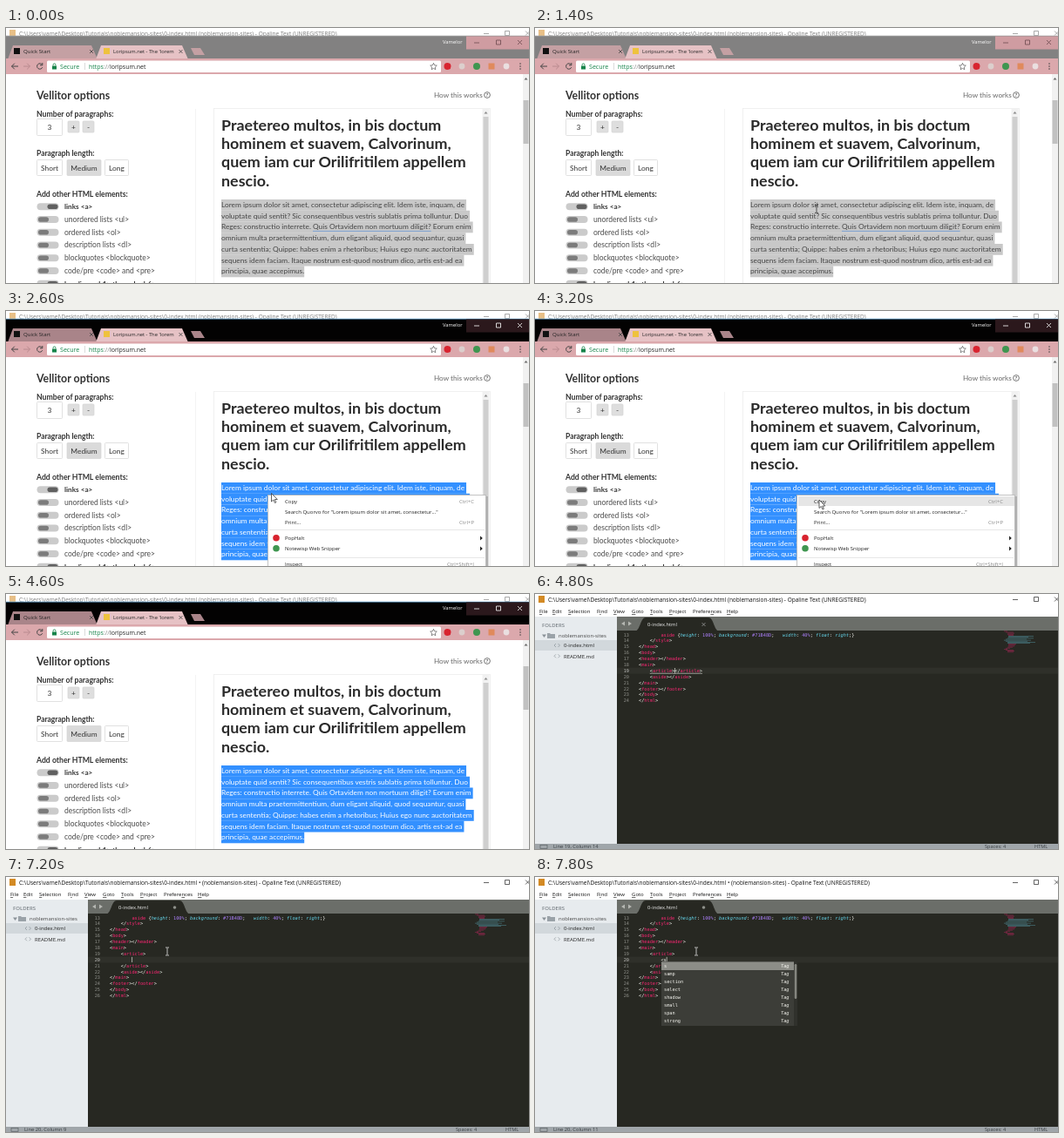
Recreate the animation shown at these times as an HTML page. Size 600 by 293 pixels, loop 8000 ms.

```html
<!DOCTYPE html>
<html lang="en">
<head>
<meta charset="utf-8">
<title>Copying filler text into an editor</title>
<style>
html, body { margin: 0; width: 100%; height: 100%; overflow: hidden; background: #fff; }
svg { display: block; width: 100vw; height: 100vh; }
text { white-space: pre; }
.bar { fill: #828181; }
.edge { fill: #a5a5a5; }
.frame { fill: #cf9ca1; }
.tab { fill: #c4a0a3; }
.label { fill: #fff; }
.mark { fill: #c8c8c8; }
.copy { fill: #444; }
.link { fill: #6b9bd8; }
.controls { stroke: #6d4a4e; }
.active .bar { fill: #030202; }
.active .edge { fill: #6fb0df; }
.active .frame { fill: #2b181c; }
.active .tab { fill: #a98489; }
.active .mark { fill: #3390ff; }
.active .copy { fill: #fff; }
.active .link { fill: none; }
.active .controls { stroke: #fff; }
</style>
</head>
<body>
<svg id="stage" viewBox="0 0 600 293" preserveAspectRatio="none"></svg>
<script>
const UI = "'Open Sans', sans-serif";
const PAGE = "Lato, sans-serif";
const CODE = "'DejaVu Sans Mono', monospace";
const stage = document.getElementById('stage');

function add(parent, tag, attrs = {}) {
  const node = document.createElementNS('http://www.w3.org/2000/svg', tag);
  for (const name in attrs) node.setAttribute(name, attrs[name]);
  parent.append(node);
  return node;
}
const group = (parent, attrs) => add(parent, 'g', attrs);
const rect = (g, x, y, width, height, fill, more) =>
  add(g, 'rect', { x, y, width, height, fill, ...more });
const circle = (g, cx, cy, r, fill, more) => add(g, 'circle', { cx, cy, r, fill, ...more });
const shape = (g, d, fill, more) => add(g, 'path', { d, fill, ...more });
const line = (g, d, stroke, width = 0.8) =>
  add(g, 'path', { d, stroke, 'stroke-width': width, fill: 'none' });

// content is a string or a list of [string, attributes] pieces
function text(g, x, y, content, size, more) {
  const node = add(g, 'text', { x, y, 'font-size': size, ...more });
  if (typeof content === 'string') node.textContent = content;
  else for (const [part, attrs] of content) add(node, 'tspan', attrs).textContent = part;
  return node;
}
const show = (node, on) => node.setAttribute('display', on ? 'inline' : 'none');

// ---------- Code editor ----------
const editor = group(stage, { 'font-family': UI });
rect(editor, 0, 0, 600, 293, '#fff');
rect(editor, 4, 2, 7, 8, '#d38a24');
const title = text(editor, 15, 8.6, '', 6.5, { fill: '#111' });
line(editor, 'M548 6.5h6M572.5 3.5h5v5h-5zM596 3.5l5 5m0 -5l-5 5', '#222', 0.7);

const menuItems = [[5, '', 'F', 'ile'], [20, '', 'E', 'dit'], [38, '', 'S', 'election'],
  [71, 'F', 'i', 'nd'], [90, '', 'V', 'iew'], [111, '', 'G', 'oto'], [132, '', 'T', 'ools'],
  [154, '', 'P', 'roject'], [181, 'Prefere', 'n', 'ces'], [220, '', 'H', 'elp']];
for (const [x, before, key, after] of menuItems)
  text(editor, x, 22, [[before], [key, { 'text-decoration': 'underline' }], [after]], 6, { fill: '#111' });

rect(editor, 0, 26, 94, 261, '#e7ebee');
rect(editor, 0, 53, 94, 12, '#d2d8dc');
text(editor, 8, 38.3, 'FOLDERS', 6, { fill: '#7b8288', 'font-weight': 600 });
shape(editor, 'M8 46.5h5l-2.5 3.5z', '#8a9298');
shape(editor, 'M14 45h3l1 1h5v5h-9z', '#9aa2a8');
text(editor, 27, 50.2, 'noblemansion-sites', 6, { fill: '#444' });
['0-index.html', 'README.md'].forEach((name, i) => {
  const y = 59 + i * 12.3;
  line(editor, `M24 ${y - 2}l-2 2l2 2M26.5 ${y - 2}l2 2l-2 2`, '#8a9298', 0.7);
  text(editor, 33, y + 2.2, name, 6, { fill: '#222' });
});

rect(editor, 94, 26, 506, 17, '#6b6e69');
rect(editor, 94, 42, 506, 245, '#272822');
shape(editor, 'M115 43C121 41 121 27 127 27H199C205 27 205 41 211 43Z', '#272822');
shape(editor, 'M103 31.5v5l-4 -2.5zM107 31.5v5l4 -2.5z', '#b5b7b2');
text(editor, 129, 37, '0-index.html', 5.8, { fill: '#eee' });
const savedMark = line(editor, 'M191.5 33l4 4m0 -4l-4 4', '#aaa', 0.7);
const dirtyMark = circle(editor, 193.5, 35, 1.8, '#8e908a');

const CHAR = 3.18, ROW = 6.88, CODE_X = 119, FIRST_ROW = 48.6;
const PINK = { fill: '#f92672' }, BLUE = { fill: '#66d9ef', 'font-style': 'italic' };
const VIOLET = { fill: '#ae81ff' };
const column = n => CODE_X + n * CHAR;
const baseline = row => FIRST_ROW + row * ROW;

const styleRule = [['aside', PINK], [' {'], ['height', BLUE], [': '], ['100%', VIOLET], ['; '],
  ['background', BLUE], [': '], ['#71B48D', VIOLET], [';   '], ['width', BLUE], [': '],
  ['40%', VIOLET], ['; '], ['float', BLUE], [': '], ['right', BLUE], [';}']];

function codeView(rows, currentRow, underlined) {
  const g = group(editor, { 'font-family': CODE, fill: '#f8f8f2' });
  rect(g, 94, baseline(currentRow) - 5.2, 506, ROW, '#2f302a');
  rows.forEach((row, i) => {
    text(g, 108, baseline(i), String(13 + i), 5.2, {
      'text-anchor': 'end', fill: i === currentRow ? '#c2c2bf' : '#90918b' });
    const indent = row.search(/\S|$/);
    const pieces = i === 0 ? styleRule : row.trim().split(/(\w+)/)
      .map(part => [part, /\w/.test(part) ? PINK : {}]);
    const more = underlined && i === currentRow ? { 'text-decoration': 'underline' } : {};
    text(g, column(indent), baseline(i), pieces, 5.28, more);
  });
  return g;
}
const head = ['        aside', '    </style>', '</head>', '<body>', '<header></header>', '<main>'];
const tail = ['    <aside></aside>', '</main>', '<footer></footer>', '</body>', '</html>'];
const closedView = codeView([...head, '    <article></article>', ...tail], 6, true);
const openView = codeView([...head, '    <article>', '', '    </article>', ...tail], 7);
const typedText = text(editor, column(8), baseline(7), '', 5.28, { fill: '#f8f8f2', 'font-family': CODE });
const caret = rect(editor, 0, 0, 0.6, 6.2, '#f8f8f0');

for (let i = 0; i < 22; i++) {
  const indent = [0, 2, 4, 4, 5, 5, 5, 4, 2][i % 9];
  const wide = i > 4 && i < 13;
  rect(editor, 538 + indent, 42.5 + i * 1.14, wide ? 20 + (i * 7) % 13 : 4 + (i * 5) % 6, 0.7,
    wide ? '#4f8d98' : '#a52655', { opacity: 0.75 });
}

const completions = group(editor, { 'font-family': CODE, fill: '#f8f8f2' });
rect(completions, 145, 97, 156, 74, '#3c3d38');
rect(completions, 145, 97.5, 152, 9.5, '#8c8d87');
rect(completions, 297, 97, 4, 74, '#30312c');
rect(completions, 297.7, 100, 2.6, 40, '#85867f', { rx: 1.3 });
['s', 'samp', 'section', 'select', 'shadow', 'small', 'span', 'strong'].forEach((name, i) => {
  text(completions, 148, 104 + i * 9.03, name, 5.28);
  text(completions, 282, 104 + i * 9.03, 'Tag', 5.28, { 'font-style': 'italic' });
});

rect(editor, 0, 287, 600, 6, '#a0a6aa');
rect(editor, 6, 288.5, 8, 4, 'none', { stroke: '#5b6165', 'stroke-width': 0.7 });
const status = text(editor, 21, 292, '', 5.8, { fill: '#383e42' });
text(editor, 516, 292, 'Spaces: 4', 5.6, { fill: '#383e42' });
text(editor, 573, 292, 'HTML', 5.6, { fill: '#383e42' });

// ---------- Browser ----------
const browser = group(stage, { 'font-family': UI });
rect(browser, 0, 0, 600, 10, '#fff', { opacity: 0.45 });
rect(browser, 0, 9, 600, 27, '', { class: 'bar' });
rect(browser, 0, 8.7, 600, 0.8, '', { class: 'edge' });
rect(browser, 528, 9.5, 72, 15, '', { class: 'frame' });
shape(browser, 'M2 36L8 20H98L105 36Z', '', { class: 'tab' });
shape(browser, 'M103 36L109 20H202L209 36Z', '#e6c2c5');
shape(browser, 'M212 23H223L228 31H216Z', '', { class: 'tab' });
rect(browser, 9, 23, 7, 7, '#111');
rect(browser, 112, 23, 7, 7, '#eec23d');
text(browser, 20, 29.3, 'Quick Start', 6.1, { fill: '#222' });
text(browser, 123, 29.3, "Loripsum.net - The 'lorem", 5.8, { fill: '#222' });
line(browser, 'M96 25l4 4m0 -4l-4 4M198.5 25l4 4m0 -4l-4 4', '#444', 0.8);
text(browser, 501, 18, 'Vamelor', 5.8, { class: 'label' });
add(browser, 'path', { d: 'M537 17h6M562.5 14h5v5h-5zM587 14l5 5m0 -5l-5 5',
  fill: 'none', class: 'controls', 'stroke-width': 0.8 });

rect(browser, 0, 35, 600, 18, '#dba8ac');
rect(browser, 47, 37.5, 452, 13.5, '#fff', { rx: 1.5 });
line(browser, 'M14 44H6.5m3.3 -3.3l-3.3 3.3l3.3 3.3', '#444', 1);
line(browser, 'M20 44h7.5m-3.3 -3.3l3.3 3.3l-3.3 3.3', '#b98a8f', 1);
line(browser, 'M41.5 42.2a3.2 3.2 0 1 0 .3 3M41.8 40v2.8h-2.8', '#444', 1);
rect(browser, 53, 43.5, 5, 4, '#16834a');
line(browser, 'M54.1 43.5v-1.3a1.4 1.4 0 0 1 2.8 0v1.3', '#16834a', 0.8);
text(browser, 62, 46.8, 'Secure', 7.1, { fill: '#16834a' });
line(browser, 'M90.5 40v8', '#ccc', 0.7);
text(browser, 95, 46.8, [['https', { fill: '#16834a' }], ['://', { fill: '#888' }],
  ['loripsum.net', { fill: '#222' }]], 7);
line(browser, 'M490.5 40.3l1.1 2.5l2.7 .3l-2 1.9l.5 2.7l-2.3 -1.3l-2.3 1.3l.5 -2.7l-2 -1.9l2.7 -.3z', '#555', 0.7);
circle(browser, 506.5, 44, 4, '#d8232f');
circle(browser, 523, 44, 3.4, '#dccfcd');
circle(browser, 540, 44, 4, '#3f9650');
rect(browser, 553.5, 40.5, 7, 7, '#e08a5c');
circle(browser, 574, 44, 3.4, '#eadfe0');
for (const y of [41, 44, 47]) circle(browser, 590, y, 0.8, '#444');

// ---------- Page ----------
const page = group(browser, { 'font-family': PAGE, fill: '#333' });
rect(page, 0, 53, 600, 240, '#fff');
const BOLD = { 'font-weight': 700 };
text(page, 35, 82, 'Vellitor options', 12.4, BOLD);
text(page, 491, 79.8, 'How this works', 8.2, { fill: '#666' });
circle(page, 552, 77, 3.4, 'none', { stroke: '#555', 'stroke-width': 0.8 });
text(page, 552, 79.3, '?', 6, { ...BOLD, 'text-anchor': 'middle', fill: '#555' });

function button(x, y, w, h, label, fill) {
  rect(page, x, y, w, h, fill, { stroke: '#d5d5d5', 'stroke-width': 0.7, rx: 1 });
  text(page, x + w / 2, y + h / 2 + 3, label, 8.4, { 'text-anchor': 'middle' });
}
text(page, 35, 102, 'Number of paragraphs:', 8.7, BOLD);
button(35.5, 104.5, 29, 19, '3', '#fff');
button(71, 107, 13, 13, '+', '#dedede');
button(88, 107, 13, 13, '-', '#dedede');
text(page, 35, 147, 'Paragraph length:', 8.5, BOLD);
button(35.5, 151.5, 29, 18, 'Short', '#fff');
button(70, 151.5, 39, 18, 'Medium', '#dadada');
button(113.5, 151.5, 27, 18, 'Long', '#fff');
text(page, 35, 194, 'Add other HTML elements:', 8.7, BOLD);

['links <a>', 'unordered lists <ul>', 'ordered lists <ol>', 'description lists <dl>',
  'blockquotes <blockquote>', 'code/pre <code> and <pre>', 'headings <h1> through <h6>'
].forEach((label, i) => {
  const y = 205.3 + i * 14.75, on = i === 0 || i === 6;
  rect(page, 35.5, y - 4, 25, 8, '#cbcbcb', { rx: 4 });
  rect(page, on ? 47.5 : 37, y - 2.8, 12, 5.6, on ? '#606060' : '#7c7c7c', { rx: 2.8 });
  text(page, 67, y + 2.8, label, on ? 8.2 : 8.5, on ? BOLD : { fill: '#4a4a4a' });
});

line(page, 'M217.5 93V293', '#f2f2f2');
rect(page, 238.5, 92.5, 317, 220, '#fff', { stroke: '#ededed', 'stroke-width': 0.8 });
rect(page, 546.5, 93, 8, 200, '#f1f1f1');
rect(page, 547.5, 102, 6, 191, '#cfcfcf');
shape(page, 'M548.5 98.5h4l-2 -2.5z', '#888');
rect(page, 593, 53, 7, 240, '#f1f1f1');
rect(page, 593.5, 83, 6, 50, '#c1c1c1');
shape(page, 'M594.5 59.5h4l-2 -2.5z', '#666');

['Praetereo multos, in bis doctum', 'hominem et suavem, Calvorinum,',
  'quem iam cur Orilifritilem appellem', 'nescio.'
].forEach((row, i) => text(page, 247, 118 + i * 21.2, row, 17.9, { ...BOLD, fill: '#2b2b2b' }));

const LINK = 'Quis Ortavidem non mortuum diligit?';
['Lorem ipsum dolor sit amet, consectetur adipiscing elit. Idem iste, inquam, de',
  'voluptate quid sentit? Sic consequentibus vestris sublatis prima tolluntur. Duo',
  `Reges: constructio interrete. ${LINK} Eorum enim`,
  'omnium multa praetermittentium, dum eligant aliquid, quod sequantur, quasi',
  'curta sententia; Quippe: habes enim a rhetoribus; Huius ego nunc auctoritatem',
  'sequens idem faciam. Itaque nostrum est-quod nostrum dico, artis est-ad ea',
  'principia, quae accepimus.'
].forEach((row, i) => {
  const y = 205.8 + i * 12.75;
  const mark = rect(page, 247, y - 8.8, 0, 12.8, '', { class: 'mark' });
  const node = text(page, 247, y, row, 8.33, { class: 'copy' });
  mark.setAttribute('width', node.getComputedTextLength() + (i < 6 ? 2 : 0));
  const start = row.indexOf(LINK);
  if (start >= 0) rect(page, 247 + node.getSubStringLength(0, start), y + 1.6,
    node.getSubStringLength(start, LINK.length), 0.8, '', { class: 'link' });
});

// ---------- Context menu ----------
const menu = group(browser, { fill: '#222' });
rect(menu, 302, 213, 251, 90, '#000', { opacity: 0.15 });
rect(menu, 300.5, 211.5, 250, 90, '#fff', { stroke: '#b5b5b5', 'stroke-width': 0.8 });
const hover = rect(menu, 302, 213, 248, 11, '#e6e6e6');
const entries = [[220.5, 'Copy', 'Ctrl+C'],
  [232.8, 'Search Quorvo for "Lorem ipsum dolor sit amet, consectetur..."', ''],
  [245, 'Print...', 'Ctrl+P'], [263, 'PopHalt', '', '#d8232f'],
  [275, 'Notewisp Web Snipper', '', '#3f9650'], [293.3, 'Inspect', 'Ctrl+Shift+I']];
for (const [y, label, keys, color] of entries) {
  text(menu, 320, y, label, 6);
  text(menu, 537, y, keys, 6, { 'text-anchor': 'end', fill: '#888' });
  if (color) {
    circle(menu, 310, y - 2.3, 3.8, color);
    shape(menu, `M544 ${y - 4.5}v5l2.8 -2.5z`, '#222');
  }
}
line(menu, 'M302 251.5H549M302 283.5H549', '#ddd', 0.7);

// ---------- Pointer ----------
const pointer = group(stage);
const arrow = shape(pointer, 'M0 0V9.5L2.3 7.5L4 11L5.4 10.3L3.8 7H6.8Z', '#fff',
  { stroke: '#222', 'stroke-width': 0.7 });
const beam = line(pointer, 'M-2 -4.5H-.6L0 -4L.6 -4.5H2M0 -4V4M-2 4.5H-.6L0 4L.6 4.5H2', '#333', 0.8);

// [time, x, y]
const route = [[1000, 612, 150], [1400, 323, 208], [2000, 304.5, 209.5], [2800, 304.5, 209.5],
  [3200, 326, 217], [3600, 326, 217], [4200, 300, 306], [5000, 300, 306], [6000, 185, 85.5]];

function position(t) {
  const next = route.findIndex(stop => stop[0] > t);
  if (next === 0) return route[0].slice(1);
  if (next < 0) return route[route.length - 1].slice(1);
  const [t0, x0, y0] = route[next - 1], [t1, x1, y1] = route[next];
  const k = (t - t0) / (t1 - t0), ease = k * k * (3 - 2 * k);
  return [x0 + (x1 - x0) * ease, y0 + (y1 - y0) * ease];
}

function render(t) {
  const inBrowser = t < 4800, opened = t >= 6800;
  const menuOpen = t >= 2400 && t < 3400;
  const typed = t >= 7600 ? '<s' : t >= 7400 ? '<' : '';

  show(browser, inBrowser);
  browser.setAttribute('class', t >= 2200 ? 'active' : '');
  show(menu, menuOpen);
  show(hover, t >= 3000);

  title.textContent = 'C:\\Users\\vamel\\Desktop\\Tutorials\\noblemansion-sites\\0-index.html'
    + (opened ? ' •' : '') + ' (noblemansion-sites) - Opaline Text (UNREGISTERED)';
  show(closedView, !opened);
  show(openView, opened);
  show(savedMark, !opened);
  show(dirtyMark, opened);
  show(completions, t >= 7600);
  typedText.textContent = typed;

  const caretColumn = opened ? 8 + typed.length : 13, caretRow = opened ? 7 : 6;
  caret.setAttribute('x', column(caretColumn));
  caret.setAttribute('y', baseline(caretRow) - 4.9);
  status.textContent = `Line ${13 + caretRow}, Column ${caretColumn + 1}`;

  pointer.setAttribute('transform', `translate(${position(t)})`);
  show(arrow, menuOpen);
  show(beam, !menuOpen);
  beam.setAttribute('stroke', inBrowser ? '#333' : '#e8e8e8');
}

const LOOP = 8000, STEP = 200;
function tick() {
  render(Math.floor(performance.now() % LOOP / STEP) * STEP);
  requestAnimationFrame(tick);
}
tick();
</script>
</body>
</html>
```
